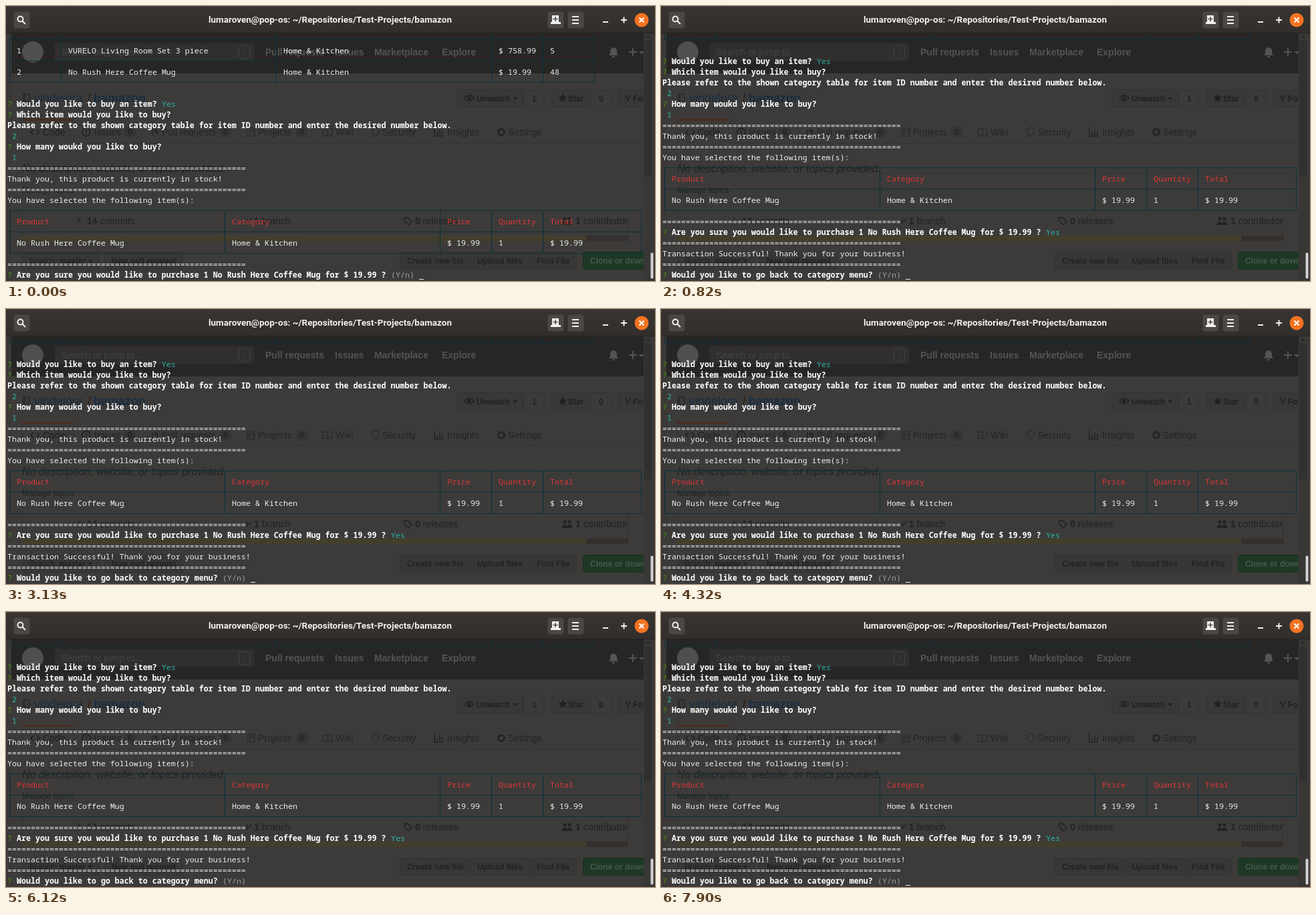
Recreate the animation shown at these times as an HTML page with a canvas. Size 971 px wide and 412 px high, loop 8 s.

```html
<!DOCTYPE html>
<html lang="en">
<head>
<meta charset="utf-8">
<title>Terminal shop</title>
<style>
html, body { margin: 0; width: 100%; height: 100%; overflow: hidden; background: #3a3938; }
canvas { display: block; }
</style>
</head>
<body>
<canvas id="stage" width="971" height="412"></canvas>
<script>
const ctx = document.getElementById('stage').getContext('2d');
const LOOP = 8000, TYPED = 500, ENTERED = 820;
const BLINKS = [1330, 1940, 2530, 3130, 3730, 4320, 4930, 5520, 6120, 6710, 7310, 7900];
const CELL = 7, ROW = 16, LEFT = 2, BASE = 407;
const MONO = '11.667px "Noto Sans Mono", "DejaVu Sans Mono", monospace';
const SANS = '"Liberation Sans", Arial, sans-serif';
const WHITE = '#ffffff', PLAIN = '#eeeeec', GREEN = '#4e9a06', CYAN = '#2bb5a4',
      RED = '#e03634', GRAY = '#a09f9d', BORDER = '#07303c';
const RULE = '='.repeat(51);
const MUG = 'No Rush Here Coffee Mug';

function rect(x, y, w, h, color) {
  ctx.fillStyle = color;
  ctx.fillRect(x, y, w, h);
}

function box(x, y, w, h, fill, stroke, radius = 3) {
  ctx.beginPath();
  ctx.roundRect(x + .5, y + .5, w - 1, h - 1, radius);
  if (fill) { ctx.fillStyle = fill; ctx.fill(); }
  if (stroke) { ctx.strokeStyle = stroke; ctx.lineWidth = 1; ctx.stroke(); }
}

function disc(x, y, r, color) {
  ctx.fillStyle = color;
  ctx.beginPath();
  ctx.arc(x, y, r, 0, Math.PI * 2);
  ctx.fill();
}

function line(points, color, width = 1.5) {
  ctx.strokeStyle = color;
  ctx.lineWidth = width;
  ctx.stroke(new Path2D(points));
}

function shape(path, color) {
  ctx.fillStyle = color;
  ctx.fill(new Path2D(path));
}

function label(str, x, y, size, color, style = '') {
  ctx.font = `${style} ${size}px ${SANS}`;
  ctx.fillStyle = color;
  ctx.fillText(str, x, y);
}

const caret = (x, y, color) => shape(`M${x} ${y}h8l-4 4z`, color);

function star(x, y, r, color) {
  ctx.beginPath();
  for (let i = 0; i < 10; i++) {
    const a = i * Math.PI / 5 - Math.PI / 2, d = i % 2 ? r * .45 : r;
    ctx.lineTo(x + d * Math.cos(a), y + d * Math.sin(a));
  }
  ctx.fillStyle = color;
  ctx.fill();
}

function drawSiteHeader() {
  const ink = '#555453';
  rect(8, 41, 946, 60, '#272625');
  disc(40, 69, 16, '#504f4e');
  box(72, 55, 300, 28, '#302f2e');
  label('Search or jump to...', 82, 74, 14, '#454443');
  box(348, 59, 17, 20, null, '#434241');
  line('M358 65l-3 8', '#434241', 1);
  [['Pull requests', 388], ['Issues', 492], ['Marketplace', 551], ['Explore', 652]]
    .forEach(([s, x]) => label(s, x, 74, 14, ink, 'bold'));
  shape('M902 74l2-3v-4q0-4 5-5q5 1 5 5v4l2 3zM907 75h4v2h-4z', ink);
  line('M932 69h12M938 63v12', ink, 2);
  caret(947, 68, ink);
}

function drawRepoHead() {
  const ink = '#21201f', edge = '#343332', blue = '#192d40';
  line('M26 132h9v11h-9zM28 132v11M28 143v4l2-1l2 1v-4', ink, 1);
  label('vindelora', 42, 144, 18, blue);
  label('/', 122, 144, 18, ink);
  label('bamazon', 131, 144, 18, blue, 'bold');

  box(674, 125, 100, 27, '#393837', edge);
  box(774, 125, 31, 27, null, edge);
  box(816, 125, 60, 27, '#393837', edge);
  box(875, 125, 31, 27, null, edge);
  box(915, 125, 60, 27, '#393837', edge);
  line('M686 138q7-8 14 0q-7 8-14 0z', ink);
  disc(693, 138, 2.5, ink);
  label('Unwatch', 704, 143, 12, ink, 'bold');
  caret(758, 137, ink);
  label('1', 787, 143, 12, ink, 'bold');
  star(833, 138, 7, ink);
  label('Star', 841, 143, 12, ink, 'bold');
  label('0', 887, 143, 12, ink, 'bold');
  line('M927 133v3l3 3l3-3v-3M930 139v5', ink);
  label('Fork', 938, 143, 12, ink, 'bold');

  rect(24, 169, 77, 3, '#4b2b20');
  line('M101.5 172v33M24.5 172v33M101 205.5h853', edge, 1);
  const tab = '#252423';
  line('M41 185l-4 4l4 4M46 185l4 4l-4 4', ink);
  label('Code', 55, 194, 14, ink);
  [['Issues', 132, 182], ['Pull requests', 233, 325], ['Projects', 377, 439], ['Wiki', 493],
   ['Security', 563], ['Insights', 660], ['Settings', 751]].forEach(([s, x, count]) => {
    label(s, x, 194, 14, tab);
    if (!count) return;
    box(count - 6, 180, 19, 18, '#353433', null, 9);
    label('0', count, 193, 12, tab, 'bold');
  });
  ctx.beginPath();
  ctx.arc(120, 189, 6, 0, Math.PI * 2);
  ctx.stroke();
  line('M120 185v5M120 191v2', tab);
  line('M219 185v9M227 194v-7h-4M225 184l-3 3l3 3', tab);
  line('M361 183h11v12h-11zM364 185v8M367 185v4M370 185v6', tab, 1);
  line('M474 184h6l1 1l1-1h6v10h-6l-1 1l-1-1h-6zM481 185v9', tab, 1);
  line('M553 182l5 2v5q0 4-5 6q-5-2-5-6v-5z', tab, 1);
  line('M641 182v13h13M645 194v-5M649 194v-9M653 194v-7', tab);
  ctx.beginPath();
  ctx.arc(741, 189, 4.5, 0, Math.PI * 2);
  ctx.strokeStyle = tab;
  ctx.lineWidth = 3;
  ctx.stroke();
}

function drawRepoBody() {
  const ink = '#232221', edge = '#343332';
  label('No description, website, or topics provided.', 24, 249, 16, ink, 'italic');
  label('Manage topics', 24, 280, 12, ink);

  box(24, 306, 907, 39, null, edge);
  [['14', 'commits', 121], ['1', 'branch', 371], ['0', 'releases', 612], ['1', 'contributor', 852]]
    .forEach(([n, s, x]) => {
      label(n, x, 327, 14, ink, 'bold');
      label(s, x + (n.length > 1 ? 19.5 : 11.7), 327, 14, ink);
    });
  ctx.beginPath();
  ctx.arc(109, 322, 5.5, 0, Math.PI * 2);
  ctx.stroke();
  line('M109 318v4h3', ink);
  line('M361 318v8M366 318q0 4-5 5', ink);
  line('M596 317h5l6 6l-5 5l-6-6z', ink);
  disc(836, 319, 2.5, ink);
  disc(843, 319, 2.5, ink);
  shape('M832 328v-3q4-4 7 0q4-4 8 0v3z', ink);
  rect(24, 344, 844, 8, '#433e2b');
  rect(868, 344, 63, 8, '#35302d');

  [[24, 116], [147, 118], [589, 106], [694, 91], [784, 70]]
    .forEach(([x, w]) => box(x, 368, w, 27, '#383736', edge));
  label('Branch:', 35, 386, 12, ink);
  label('master', 80, 386, 12, ink, 'bold');
  caret(122, 380, ink);
  [['New pull request', 158], ['Create new file', 600], ['Upload files', 705], ['Find File', 794]]
    .forEach(([s, x]) => label(s, x, 386, 12, ink, 'bold'));
  box(863, 368, 110, 27, '#1d3824', '#1a3020');
  label('Clone or download', 874, 386, 12, '#46594b', 'bold');
}

function drawPage() {
  rect(0, 41, 971, 371, '#3a3938');
  ctx.save();
  ctx.beginPath();
  ctx.rect(8, 41, 946, 371);
  ctx.clip();
  rect(8, 101, 946, 311, '#3c3b3a');
  drawSiteHeader();
  drawRepoHead();
  drawRepoBody();
  ctx.restore();
  rect(954, 41, 13, 371, '#383736');
  rect(955, 52, 11, 203, '#313030');
  shape('M957 48l3.5-4l3.5 4z', '#2a2928');
}

function drawTitleBar() {
  const ink = '#f2f1f0', face = '#4b4744';
  const shade = ctx.createLinearGradient(0, 0, 0, 41);
  shade.addColorStop(0, '#383432');
  shade.addColorStop(1, '#312e2c');
  rect(0, 0, 971, 41, shade);
  rect(0, 0, 971, 1, '#4a4643');
  rect(0, 40, 971, 1, '#252321');
  [11, 810, 840].forEach(x => box(x, 8, 25, 26, face, null, 4));

  ctx.font = 'bold 13.5px Roboto, "Open Sans", sans-serif';
  ctx.fillStyle = ink;
  ctx.textAlign = 'center';
  ctx.fillText('lumaroven@pop-os: ~/Repositories/Test-Projects/bamazon', 485, 25);
  ctx.textAlign = 'left';

  ctx.beginPath();
  ctx.arc(21.5, 19.5, 4, 0, Math.PI * 2);
  ctx.strokeStyle = ink;
  ctx.lineWidth = 2;
  ctx.stroke();
  line('M24.5 22.5l4.5 4.5', ink, 2);
  shape('M817 14h10v10h3v3h-15v-3h2z', ink);
  line('M822 16v7M818.500 19.5h7', face, 1.5);
  line('M847 16h10M847 21h10M847 26h10', ink, 2);
  line('M893 24h8', ink, 2);
  line('M920 21h9M924.500 16.5v9', ink, 2);
  disc(951, 21, 10.5, '#f47321');
  line('M947.500 17.500l7 7M954.500 17.500l-7 7', '#ffffff', 2);
}

// Rows are counted upwards from the bottom line of the terminal.
function put(str, col, row, color = PLAIN, bold = false) {
  ctx.font = (bold ? 'bold ' : '') + MONO;
  ctx.fillStyle = color;
  ctx.fillText(str, LEFT + col * CELL, BASE - row * ROW);
}

function ask(question, row, answer) {
  put('?', 0, row, GREEN);
  put(question, 2, row, WHITE, true);
  if (answer) put(answer, question.length + 3, row, CYAN);
}

function askOpen(question, typed, cursor) {
  ask(question, 0);
  const col = question.length + 3;
  put('(Y/n)', col, 0, GRAY);
  put(typed, col + 6, 0);
  if (cursor) rect(LEFT + (col + 6 + typed.length) * CELL, BASE + 2, CELL, 1, PLAIN);
}

function grid(cols, bottom, cells, open) {
  const xs = cols.map(c => LEFT + c * CELL + 3);
  const edgeY = row => 402 - row * ROW;
  const top = bottom + cells.length * 2;
  const startY = open ? edgeY(top) - ROW : edgeY(top);
  for (let r = bottom; r <= top; r += 2)
    rect(xs[0], edgeY(r), xs[xs.length - 1] - xs[0] + 1, 1, BORDER);
  xs.forEach(x => rect(x, startY, 1, edgeY(bottom) - startY, BORDER));
  cells.forEach((row, i) => row.forEach((s, j) =>
    put(s, cols[j] + 2, top - 1 - i * 2, !open && i === 0 ? RED : PLAIN)));
}

function drawSession(up) {
  grid([0, 11, 57, 103, 114, 125], 18 + up, [
    ['1', 'VURELO Living Room Set 3 piece', 'Home & Kitchen', '$ 758.99', '5'],
    ['2', MUG, 'Home & Kitchen', '$ 19.99', '48']
  ], true);
  ask('Would you like to buy an item?', 16 + up, 'Yes');
  ask('Which item would you like to buy?', 15 + up);
  put('Please refer to the shown category table for item ID number and enter the desired number below.',
    0, 14 + up, WHITE, true);
  put('2', 1, 13 + up, CYAN);
  ask('How many woukd you like to buy?', 12 + up);
  put('1', 1, 11 + up, CYAN);
  put(RULE, 0, 10 + up);
  put('Thank you, this product is currently in stock!', 0, 9 + up);
  put(RULE, 0, 8 + up);
  put('You have selected the following item(s):', 0, 7 + up);
  grid([0, 46, 92, 103, 114, 135], 2 + up, [
    ['Product', 'Category', 'Price', 'Quantity', 'Total'],
    [MUG, 'Home & Kitchen', '$ 19.99', '1', '$ 19.99']
  ]);
  put(RULE, 0, 1 + up);
}

function drawTerminal(t) {
  const confirm = `Are you sure you would like to purchase 1 ${MUG} for $ 19.99 ?`;
  ctx.save();
  ctx.beginPath();
  ctx.rect(0, 42, 971, 370);
  ctx.clip();
  if (t < ENTERED) {
    drawSession(0);
    askOpen(confirm, t < TYPED ? '' : 'y', true);
  } else {
    drawSession(4);
    ask(confirm, 4, 'Yes');
    put(RULE, 0, 3);
    put('Transaction Successful! Thank you for your business!', 0, 2);
    put(RULE, 0, 1);
    const toggles = BLINKS.filter(b => t >= b).length;
    askOpen('Would you like to go back to category menu?', '', toggles % 2 === 0);
  }
  ctx.restore();
  box(964, 369, 5, 40, '#d3d2d1', null, 2);
}

function frame() {
  drawPage();
  drawTerminal(performance.now() % LOOP);
  drawTitleBar();
  requestAnimationFrame(frame);
}
frame();
</script>
</body>
</html>
```
